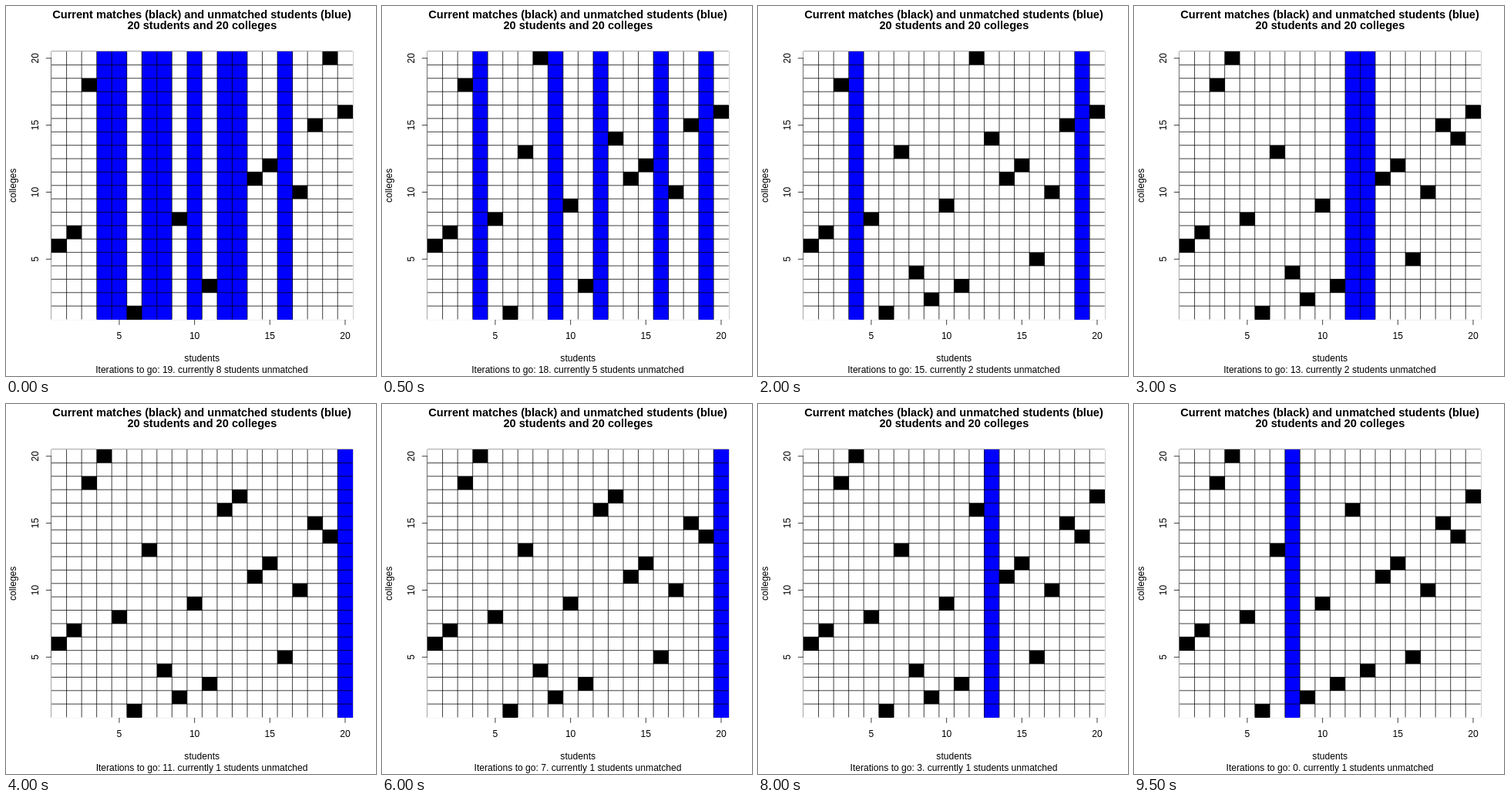
These frames come from a looping animation (480 by 480 pixels, 10 s). An HTML page:

```html
<!DOCTYPE html>
<html lang="en">
<head>
<meta charset="utf-8">
<title>Student and college matching</title>
<style>
  html, body { margin: 0; width: 100%; height: 100%; overflow: hidden; background: #fff; }
  svg { display: block; width: 480px; height: 480px; }
  text { font: 12.1px "Liberation Sans", Arial, sans-serif; text-anchor: middle; fill: #000; }
  .title { font-size: 14.6px; font-weight: bold; }
  .line { stroke: #000; stroke-width: .75; fill: none; }
  .cell { shape-rendering: crispEdges; }
</style>
</head>
<body>
<svg id="stage" viewBox="0 0 480 480"></svg>
<script>
const N = 20, STEP = 500, STEPS = 20;
const L = 59.04, R = 449.76, T = 59.04, B = 406.56;
const stage = document.getElementById('stage');

// College held by each student at the start; 0 means unmatched.
const start = [6, 7, 18, 0, 0, 1, 0, 0, 8, 0, 3, 0, 0, 11, 12, 0, 10, 15, 20, 16];

// step: [student, college] pairs that change
const changes = {
  1: [[5, 8], [7, 13], [8, 20], [9, 0], [10, 9], [13, 14], [19, 0]],
  2: [[9, 2], [16, 5]],
  3: [[8, 0], [12, 20]],
  4: [[8, 4]],
  5: [[4, 20], [12, 0], [13, 0], [19, 14]],
  7: [[12, 16], [13, 17], [20, 0]],
  13: [[13, 0], [20, 17]],
  17: [[8, 0], [13, 4]]
};

const states = [];
for (let i = 0, now = start; i < STEPS; i++) {
  now = now.slice();
  for (const [student, college] of changes[i] || []) now[student - 1] = college;
  states.push(now);
}

function add(tag, attrs, content = '') {
  const el = document.createElementNS('http://www.w3.org/2000/svg', tag);
  for (const key in attrs) el.setAttribute(key, attrs[key]);
  el.textContent = content;
  return stage.appendChild(el);
}
const line = d => add('path', { d, class: 'line' });
const label = (x, y, content, cls = '') => add('text', { x, y, class: cls }, content);
const sideLabel = (x, y, content) =>
  add('text', { transform: `translate(${x} ${y}) rotate(-90)` }, content);
const rect = (x0, y0, x1, y1, fill) =>
  add('rect', { x: x0, y: y0, width: x1 - x0, height: y1 - y0, fill, class: 'cell' });

const px = v => L + (v - .5) * (R - L) / N;
const py = v => B - (v - .5) * (B - T) / N;
const rx = v => Math.round(px(v));
const ry = v => Math.round(py(v));

// Frame and axes sit under the cells, which hide their inner half.
line(`M${L} ${T}H${R}V${B}H${L}Z`);
line(`M${px(5)} ${B}H${px(20)}M${L} ${py(5)}V${py(20)}`);
for (let v = 5; v <= N; v += 5) {
  line(`M${px(v)} ${B}v7.2M${L} ${py(v)}h-7.2`);
  label(px(v), 432, v);
  sideLabel(42, py(v), v);
}
rect(59, 59, 450, 407, '#fff');

const cells = start.map(() => rect(0, 0, 0, 0, '#000'));

for (let v = 1.5; v < N; v++) {
  line(`M${px(v)} ${T}V${B}`);
  line(`M${L} ${py(v)}H${R}`);
}

label(254, 16, 'Current matches (black) and unmatched students (blue)', 'title');
label(254.4, 30, '20 students and 20 colleges', 'title');
label(254.2, 461, 'students');
sideLabel(13, 232.8, 'colleges');
const status = label(254, 476, '');

function show(step) {
  const state = states[step];
  state.forEach((college, i) => {
    const top = college ? ry(college + .5) : 59;
    const bottom = college ? ry(college - .5) : 407;
    const el = cells[i];
    el.setAttribute('x', rx(i + .5));
    el.setAttribute('width', rx(i + 1.5) - rx(i + .5));
    el.setAttribute('y', top);
    el.setAttribute('height', bottom - top);
    el.setAttribute('fill', college ? '#000' : '#00f');
  });
  const free = state.filter(college => !college).length;
  status.textContent =
    `Iterations to go: ${STEPS - 1 - step}. currently ${free} students unmatched`;
}

// Cell columns are centred on i + 1, so their edges lie at i + .5 and i + 1.5.
let shown = -1;
function tick() {
  const step = Math.floor(performance.now() / STEP) % STEPS;
  if (step !== shown) show(shown = step);
  requestAnimationFrame(tick);
}
show(0);
requestAnimationFrame(tick);
</script>
</body>
</html>
```
